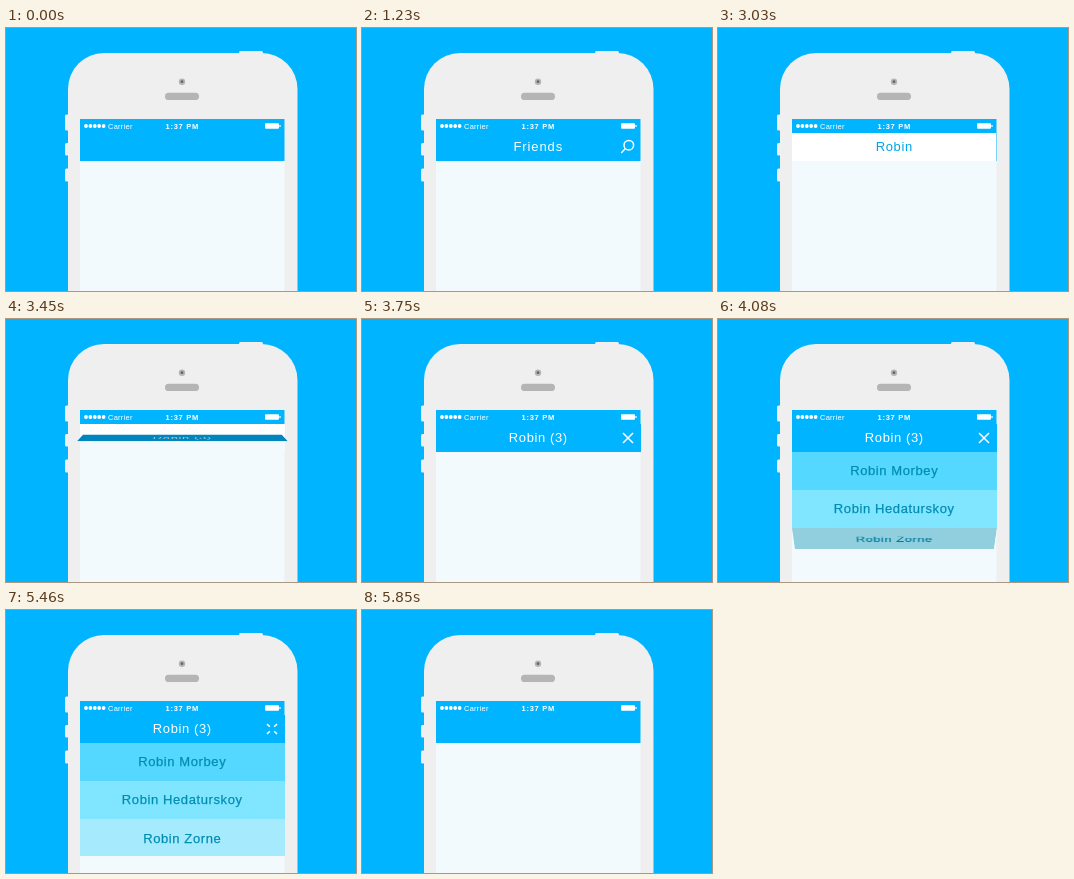
Recreate the animation shown at these times as an HTML page. Size 350x263 px, loop 6.09 s.

```html
<!DOCTYPE html>
<html lang="en">
<head>
<meta charset="utf-8">
<title>Friend search</title>
<style>
  :root { --blue: #00b4ff; --paper: #f2fafe; }
  html, body { margin: 0; width: 100%; height: 100%; overflow: hidden; background: var(--blue); }
  #stage { position: relative; width: 350px; height: 263px; overflow: hidden;
    font: 13px/28px "Liberation Sans", Arial, sans-serif; letter-spacing: .6px; color: #fff; }
  #stage > * { position: absolute; }
  svg { left: 0; top: 0; }
  .panel { left: 74px; width: 204.5px; top: 105px; height: 28px; text-align: center; white-space: pre; }
  .well { background: linear-gradient(#fff 45%, var(--paper) 55%); }
  .front { background: #fff; }
  .front, .query { color: #00a3e6; }
  .back { background: var(--blue); }
  .friends { letter-spacing: .9px; }
  .bar { background: #fff; }
  .row { height: 38px; line-height: 38px; color: #008cb2; transform-origin: 50% 0;
    -webkit-text-stroke: .25px #008cb2; }
  .shade { position: absolute; inset: 0; background: #000; opacity: 0; }
</style>
</head>
<body>
<div id="stage">
  <svg width="350" height="263">
    <g fill="#efefef">
      <rect x="233" y="23" width="24" height="6" rx="1.5"/>
      <rect x="59" y="86.5" width="6" height="16" rx="1.5"/>
      <rect x="59" y="115" width="6" height="12.5" rx="1.5"/>
      <rect x="59" y="140.5" width="6" height="13" rx="1.5"/>
      <rect x="62" y="25" width="229.5" height="300" rx="36"/>
    </g>
    <circle cx="176" cy="53.7" r="3.2" fill="#b5b5b5"/>
    <circle cx="176" cy="53.7" r="1.4" fill="#666"/>
    <rect x="159" y="64.8" width="34" height="7.2" rx="3.6" fill="#b5b5b5"/>
    <rect x="74" y="91" width="204.5" height="172" fill="#f2fafe"/>
    <rect x="74" y="91" width="204.5" height="42" fill="#00b4ff"/>
    <g fill="#fff" font-size="7.5">
      <path d="M80 98h18" stroke="#fff" stroke-width="3.8" stroke-linecap="round" stroke-dasharray="0 4.4"/>
      <text x="102" y="100.8" letter-spacing=".25">Carrier</text>
      <text x="159.5" y="100.8" letter-spacing=".75" font-weight="bold">1:37 PM</text>
      <rect x="259" y="95.3" width="14" height="5.4" rx="1"/>
      <rect x="273.4" y="97" width="1.2" height="2" rx=".5"/>
    </g>
    <g class="lens" fill="none" stroke="#fff" stroke-width="1.5">
      <circle cx="266.8" cy="117.2" r="4.8"/>
      <path class="handle" d="M263.4 120.6L259.2 125" stroke-dasharray="6.2 20"/>
    </g>
  </svg>
  <div class="panel friends">Friends</div>
  <div class="bar"></div>
  <div class="panel query"></div>
  <div class="panel well"></div>
  <div class="panel front">Robin<div class="shade"></div></div>
  <div class="panel back"><span class="title">Robin (3)</span><div class="shade"></div></div>
  <svg class="closeBox" width="350" height="263">
    <path class="close" fill="none" stroke="#fff" stroke-width="1.5"
      d="M266 119l10.5 -10.5M266 119l10.5 10.5M266 119l-10.5 10.5M266 119l-10.5 -10.5"/>
  </svg>
</div>
<script>
const LOOP = 6090;
const stage = document.getElementById('stage');
const $ = (selector, root = stage) => root.querySelector(selector);

// steps: [time in ms, properties, easing towards the next step]
function play(el, steps) {
  const first = steps[0], last = steps[steps.length - 1];
  const frames = [[0, first[1]], ...steps, [LOOP, last[1]]].map(([ms, props, easing = 'linear']) =>
    ({ ...props, easing, offset: ms / LOOP }));
  el.animate(frames, { duration: LOOP, iterations: Infinity });
}

function fade(el, inFrom, inTo, outFrom, outTo) {
  play(el, [[inFrom, { opacity: 0 }], [inTo, { opacity: 1 }],
            [outFrom, { opacity: 1 }], [outTo, { opacity: 0 }]]);
}

const show = (el, from, to) => fade(el, from, from, to, to);
const tilt = (deg, depth) => ({ transform: `perspective(${depth}px) rotateX(${deg}deg)` });

function turn(el, start, end, from, to, easing, depth, dark) {
  const shadow = deg => ({ opacity: dark * Math.abs(deg) / 90 });
  play(el, [[start, tilt(from, depth), easing], [end, tilt(to, depth)]]);
  play($('.shade', el), [[start, shadow(from), easing], [end, shadow(to)]]);
}

// Title and magnifier
fade($('.friends'), 150, 450, 1230, 1470);
fade($('.lens'), 150, 450, 1400, 1450);
play($('.handle'), [[1230, { strokeDashoffset: '0px' }, 'ease-in'], [1380, { strokeDashoffset: '6.2px' }]]);

// Search field
const box = (left, top, width, height, radius) => ({
  left: left + 'px', top: top + 'px', width: width + 'px', height: height + 'px', borderRadius: radius + 'px'
});
const bar = $('.bar');
fade(bar, 1350, 1430, 3120, 3120);
play(bar, [
  [1380, box(261.3, 111.7, 11, 11, 8), 'ease-in-out'],
  [1700, box(78, 112, 197, 15.5, 8), 'ease-in-out'],
  [1860, box(81.3, 111.6, 190.4, 16, 8), 'ease-out'],
  [2000, box(82, 111.7, 189, 16, 8)],
  [2490, box(82, 111.7, 189, 16, 8), 'ease-in-out'],
  [3090, box(74, 105, 204.5, 28, 0)]
]);
[...'Robin'].forEach((letter, i) => {
  const span = document.createElement('span');
  span.textContent = letter;
  $('.query').append(span);
  const start = 2120 + i * 65;
  fade(span, start, start + 80, 3120, 3120);
});

// Header flip
show($('.well'), 3120, 3750);
show($('.front'), 3120, 3420);
show($('.back'), 3420, 5850);
turn($('.front'), 3120, 3420, 0, -90, 'ease-in', 450, .27);
turn($('.back'), 3420, 3750, 90, 0, 'ease-out', 450, .3);
fade($('.title'), 3420, 3420, 5460, 5730);

// Close mark
const dash = (gap, length) => ({ strokeDasharray: `0px, ${gap}px, ${length}px, 30px` });
fade($('.closeBox'), 3540, 3720, 5580, 5760);
play($('.close'), [
  [5430, dash(0, 7.1)], [5460, dash(3, 4.1), 'ease-out'], [5760, dash(14.8, 0)]
]);

// Results: [name, top, colour, start, end]
[
  ['Robin Morbey', 133, '#55d8ff', 3750, 3990],
  ['Robin Hedaturskoy', 171, '#80e6ff', 3840, 4080],
  ['Robin Zorne', 209, '#a5ebfd', 3990, 4410]
].forEach(([name, top, colour, start, end], i) => {
  const row = document.createElement('div');
  row.className = 'panel row';
  row.textContent = name;
  row.style.top = top + 'px';
  row.style.background = colour;
  if (i === 2) Object.assign(row.style, { height: '37px', lineHeight: '40px' });
  row.insertAdjacentHTML('beforeend', '<div class="shade"></div>');
  stage.append(row);
  fade(row, start, start, 5460, 5820);
  turn(row, start, end, -90, 0, 'cubic-bezier(.25,.46,.45,.94)', 1000, .2);
});
</script>
</body>
</html>
```
